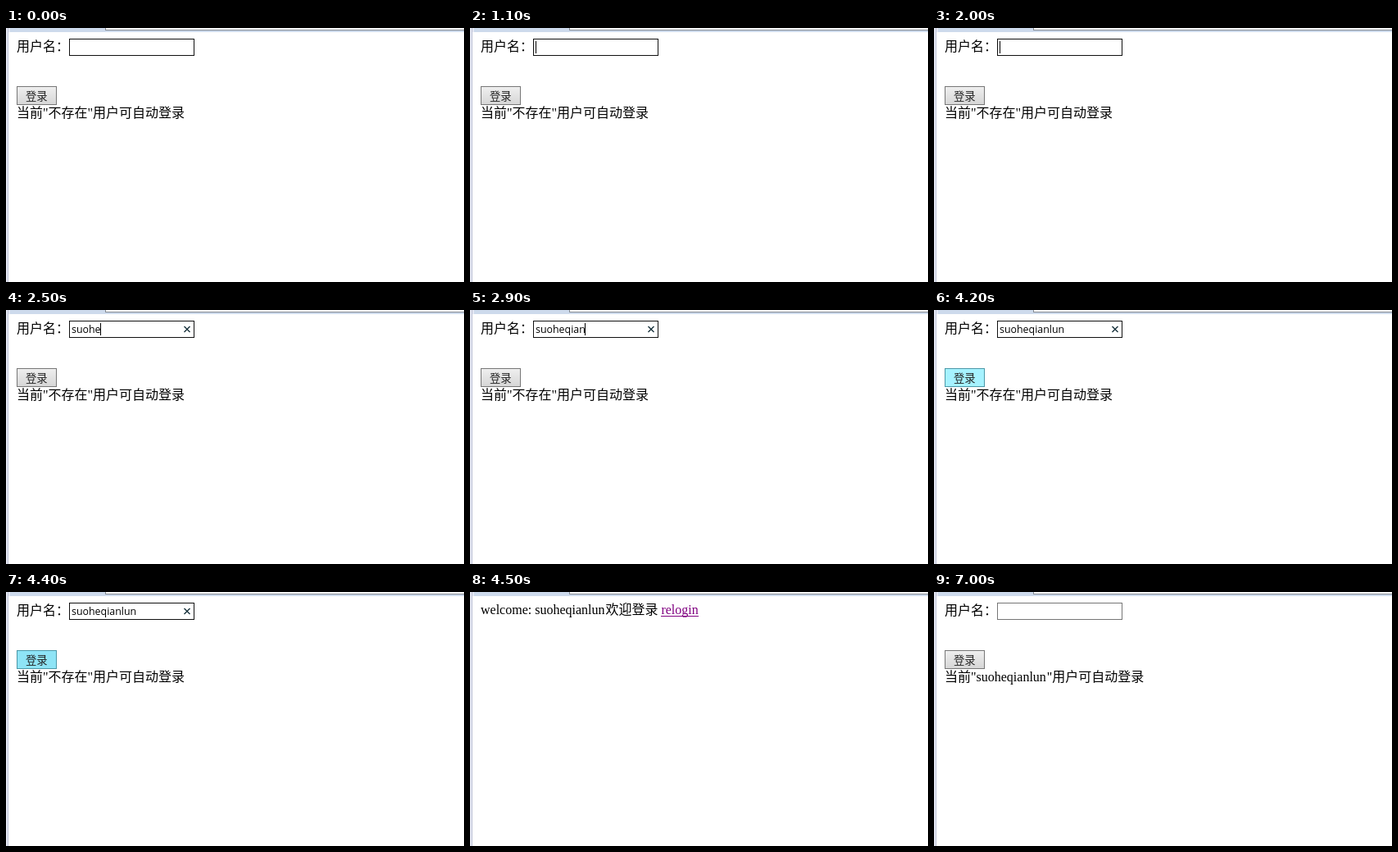
An HTML page that plays this animation: 559x310 px, repeating every 8000 ms.

```html
<!DOCTYPE html>
<html lang="zh-CN">
<head>
<meta charset="utf-8">
<style>
html, body { margin: 0; width: 100%; height: 100%; overflow: hidden; background: #fff; }
svg { display: block; }
text { font: 16px "Liberation Serif", "Noto Sans CJK SC", "Noto Sans CJK", serif; white-space: pre; }
#typed { font: 12.4px "Open Sans", sans-serif; }
#btnText { font: 13.33px "Noto Sans CJK SC", "Noto Sans CJK", sans-serif; fill: #222; }
.link { fill: #800080; }
</style>
</head>
<body>
<svg width="559" height="310" viewBox="0 0 559 310">
  <defs>
    <linearGradient id="grey" x2="0" y2="1">
      <stop stop-color="#efefef"/><stop offset="1" stop-color="#d6d6d6"/>
    </linearGradient>
  </defs>

  <!-- browser edge -->
  <g shape-rendering="crispEdges">
    <path fill="#e4e7f3" d="M0 0h5v5H2v305H0z"/>
    <path fill="#bfc3d6" d="M2 0h1v310H2z"/>
    <path fill="#cddaec" d="M5 0h554v5H5z"/>
    <path fill="#858a92" d="M121 0h438v3H121z"/>
    <path fill="#fff" d="M122 0h437v2H122z"/>
  </g>

  <g id="form">
    <text x="13" y="28">用户名：</text>
    <rect id="field" x="77.5" y="13.5" width="152" height="20" fill="#fff"/>
    <text id="typed" x="80" y="28"></text>
    <path id="clear" d="M217.5 20l7 7m0-7l-7 7" stroke="#17323c" stroke-width="1.4"/>
    <rect id="caret" y="16" width="1" height="15" shape-rendering="crispEdges"/>
    <rect id="button" x="13.5" y="71.5" width="48" height="22"/>
    <text id="btnText" x="24" y="88">登录</text>
    <text x="13" y="109">当前"</text>
    <text id="user" x="51.5" y="109"></text>
    <text id="tail" y="109">"用户可自动登录</text>
  </g>

  <g id="welcome">
    <text x="13" y="27">welcome: </text>
    <text id="guest" x="79.2" y="27"></text>
    <text x="165.4" y="27">欢迎登录</text>
    <text class="link" x="233.4" y="27">relogin</text>
    <rect class="link" x="233" y="29" width="46" height="1" shape-rendering="crispEdges"/>
  </g>
</svg>
<script>
const NAME = 'suoheqianlun';
const LOOP = 8000, SUBMIT = 4500, BACK = 7000;
// moments at which each letter is typed
const keys = [...NAME].map((_, i) => i < 10 ? 2100 + i * 100 : 2200 + i * 100);
const caretSpans = [[1100, 1500], [2000, 3800], [4300, 4400]];

const $ = id => document.getElementById(id);
const show = (id, on) => $(id).setAttribute('visibility', on ? 'inherit' : 'hidden');
const set = (id, attrs) => {
  for (const k in attrs) $(id).setAttribute(k, attrs[k]);
};

function buttonLook(t) {
  if (t < 4200 || t >= SUBMIT) return { fill: 'url(#grey)', stroke: '#777' };
  return { fill: t < 4400 ? '#a6f2ff' : '#8ee4f6', stroke: '#4b98a8' };
}

function draw(t) {
  const back = t >= BACK;
  const welcome = t >= SUBMIT && !back;
  const count = back ? 0 : keys.filter(k => t >= k).length;

  set('form', { visibility: welcome ? 'hidden' : 'visible' });
  set('welcome', { visibility: welcome ? 'visible' : 'hidden' });

  $('typed').textContent = NAME.slice(0, count);
  const width = count ? $('typed').getComputedTextLength() : 0;
  set('caret', { x: Math.floor(80 + width) });
  show('caret', caretSpans.some(([a, b]) => t >= a && t < b));
  show('clear', count > 0);

  set('field', { stroke: back ? '#767676' : '#111' });
  set('button', buttonLook(t));
  $('user').textContent = back ? NAME : '不存在';
  set('tail', { x: back ? 137.7 : 99.5 });
}

$('guest').textContent = NAME;
const start = performance.now();
function tick() {
  draw((performance.now() - start) % LOOP);
  requestAnimationFrame(tick);
}
tick();
</script>
</body>
</html>
```
